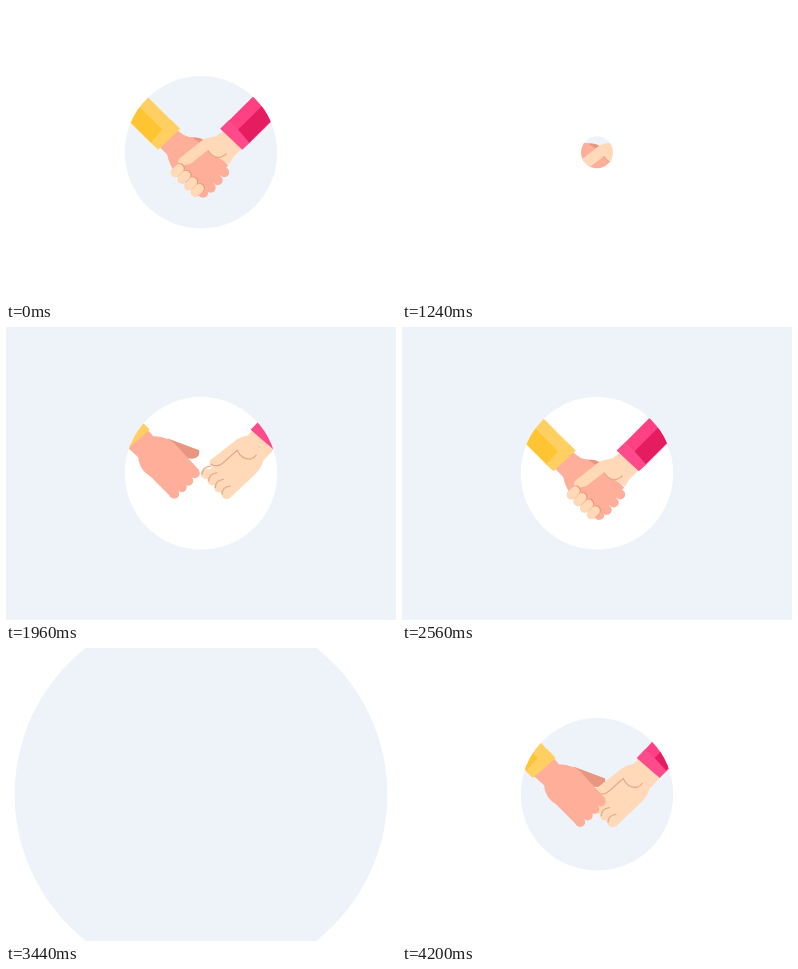
Animation of 390x293 px, one loop 4.24 s. Source, as an HTML page:

```html
<!DOCTYPE html>
<html lang="en">
<head>
<meta charset="utf-8">
<title>Handshake</title>
<style>
  html, body { margin: 0; width: 100%; height: 100%; overflow: hidden; background: #fff; }
  svg { display: block; width: 100%; height: 100%; }
  .skin { fill: #ffae9a; }
  .peach { fill: #ffd9b8; }
  .shade { fill: #e99681; }
  .crease { fill: none; stroke: #e5ab8e; stroke-width: 1.3; stroke-linecap: round; }
</style>
</head>
<body>
<svg viewBox="0 0 390 293">
  <defs>
    <clipPath id="clip"><circle id="hole" cx="195" cy="146.3" r="76"/></clipPath>
  </defs>
  <rect id="back" width="390" height="293"/>
  <circle id="disc" cx="195" cy="146.3" r="76"/>
  <g clip-path="url(#clip)"><g transform="translate(-.8 .2)">
    <g id="reach">
      <g id="thumb">
        <path class="shade" d="M162 111L194 123Q195 131 187 131.500Q181 132 175 127Z"/>
      </g>
      <g id="reachR">
        <path class="peach" d="M249 102L242 108.500Q235 109.500 230 113.500L205 133Q203 137 207 140L200 146L221 167L225 170.500L250 147Q257 140 258 133.500L268 123Z"/>
        <g id="tipsR" class="peach"></g>
        <path class="crease" d="M206 137Q212 141 218 135.500L232 123Q236 132 245 132Q249 131 251 128"/>
        <g id="knuckles" class="crease"></g>
      </g>
      <g id="reachL">
        <path class="skin" d="M141 101L148 109Q154 108.500 160 111Q165 112 169 116L194 143L166 170L145 149Q137 144 135 138Q133 134 133 130L122 120Z"/>
        <g id="tipsL" class="skin"></g>
      </g>
    </g>
    <g id="grip">
      <path class="skin" d="M166 124L174 131.500Q179 136 184 136.800Q191 136.500 198 140L223 165L198 195L191 191L167 168Q163 161 162 154.500L151 143Z"/>
      <g id="gripTips" class="skin"></g>
      <path class="shade" d="M187 137.500Q193 136.500 198.500 139.500L194 142Z"/>
      <path class="peach" d="M224 125L216 132.500Q211 136.700 206 137Q200 137.500 196 141L175 157.500Q171 161.500 174 164Q179 166.500 186 163L202.500 150Q207 156 213 157.500L224 164Q226 160 228.500 156.500L241 144Z"/>
      <path class="crease" d="M203 150.500Q207 157 213 157.300Q218 157 221 153.500"/>
      <g id="fingers" fill="none" stroke-linecap="round"></g>
    </g>
    <g id="sleeveL"></g>
    <g transform="matrix(-1 0 0 1 390 0)"><g id="sleeveR"></g></g>
  </g></g>
</svg>
<script>
const $ = id => document.getElementById(id);
const HALF = 2120, R = 76.2, FAR = 310;
const SHUT = 840, FLIP = 1260, ENTER = 1640;
const PALE = '#eef3fa', WHITE = '#ffffff';

const dots = (points, r) =>
  points.map(([x, y]) => `<circle cx="${x}" cy="${y}" r="${r}"/>`).join('');

const sleeve = (light, dark, cuff) =>
  `<path fill="${light}" d="M165 119L143 140L63 54L93 41Z"/>` +
  `<path fill="${cuff}" d="M173 127L150 147L142.500 139.500L155 127.500L164.500 118Z"/>` +
  `<path fill="${dark}" d="M155 127L143.500 139.500L63 53.500L75 41Z"/>`;

$('sleeveL').innerHTML = sleeve('#ffd061', '#ffc432', '#ffd061');
$('sleeveR').innerHTML = sleeve('#ff4183', '#e51c60', '#ff4b8b');
$('tipsL').innerHTML = dots([[189.5, 146], [183, 153.5], [176.5, 160], [169, 166.5]], 5);
$('tipsR').innerHTML = dots([[201, 146.5], [207.5, 153], [214, 160], [221.5, 166.5]], 5.2);
$('gripTips').innerHTML = dots([[198, 192.5], [205.5, 187.5], [212.5, 180], [219, 172]], 5);
$('knuckles').innerHTML = [0, 1, 2, 3].map(i =>
  `<path d="M${197 + i * 6.6} ${147 + i * 6.6}q0 -7 8 -8"/>`).join('');

// Four curled fingers, each with a thin shadow along its upper edge.
$('fingers').innerHTML = [0, 1, 2, 3].map(i => {
  const d = `M${170 + i * 6.7} ${172.5 + i * 6.6}l4 -4`;
  return `<path d="${d}" stroke="#e99681" stroke-width="9.500" transform="translate(.9 -.6)"/>` +
         `<path d="${d}" stroke="#ffd9b8" stroke-width="9.200"/>`;
}).join('');

const clamp = v => Math.min(1, Math.max(0, v));
const backIn = t => t * t * (2.70158 * t - 1.70158);
const backOut = t => 1 - backIn(1 - t);
const move = (id, x, y, extra = '') =>
  $(id).setAttribute('transform', `translate(${x} ${y}) ${extra}`);

const SHAKE = [[0, 0], [200, 1.35], [390, 0], [585, 1.35], [SHUT, 1]];

function shake(u) {
  for (let i = 1; i < SHAKE.length; i++) {
    const [t0, a] = SHAKE[i - 1], [t1, b] = SHAKE[i];
    if (u < t1) return a + (b - a) * (1 - Math.cos(Math.PI * (u - t0) / (t1 - t0))) / 2;
  }
  return 1;
}

function draw(time) {
  const t = time % (2 * HALF), u = t % HALF;
  const pair = t < HALF ? [WHITE, PALE] : [PALE, WHITE];
  const flipped = u >= FLIP;

  // The old backdrop shrinks into the next disc.
  const r = flipped
    ? FAR + (R - FAR) * backOut(clamp((u - FLIP) / 440))
    : R * (1 - backIn(clamp((u - SHUT) / 420)));
  $('back').setAttribute('fill', pair[flipped ? 1 : 0]);
  $('disc').setAttribute('fill', pair[flipped ? 0 : 1]);
  for (const id of ['disc', 'hole']) $(id).setAttribute('r', Math.max(0, r));

  const reaching = u >= ENTER;
  $('reach').style.display = reaching ? '' : 'none';
  $('grip').style.display = flipped ? 'none' : '';
  for (const id of ['sleeveL', 'sleeveR'])
    $(id).style.display = flipped && !reaching ? 'none' : '';

  if (reaching) {
    const k = (1 - (u - ENTER) / (HALF - ENTER)) ** 2;
    const x = 10.7 - 96 * k, y = 7.8 - 70 * k;
    move('thumb', x, y);
    move('reachL', x, y);
    move('reachR', -x, y);
    for (const id of ['sleeveL', 'sleeveR']) move(id, x - 28.5, y - 24.5);
  } else if (!flipped) {
    const q = 1 - shake(u);
    move('grip', 0, -6 * q);
    for (const id of ['sleeveL', 'sleeveR'])
      move(id, 2.5 * q, -4 * q, `rotate(${-2.5 * q} 160 137)`);
  }
}

let start;
function tick(now) {
  start ??= now;
  draw(now - start);
  requestAnimationFrame(tick);
}
draw(0);
requestAnimationFrame(tick);
</script>
</body>
</html>
```
